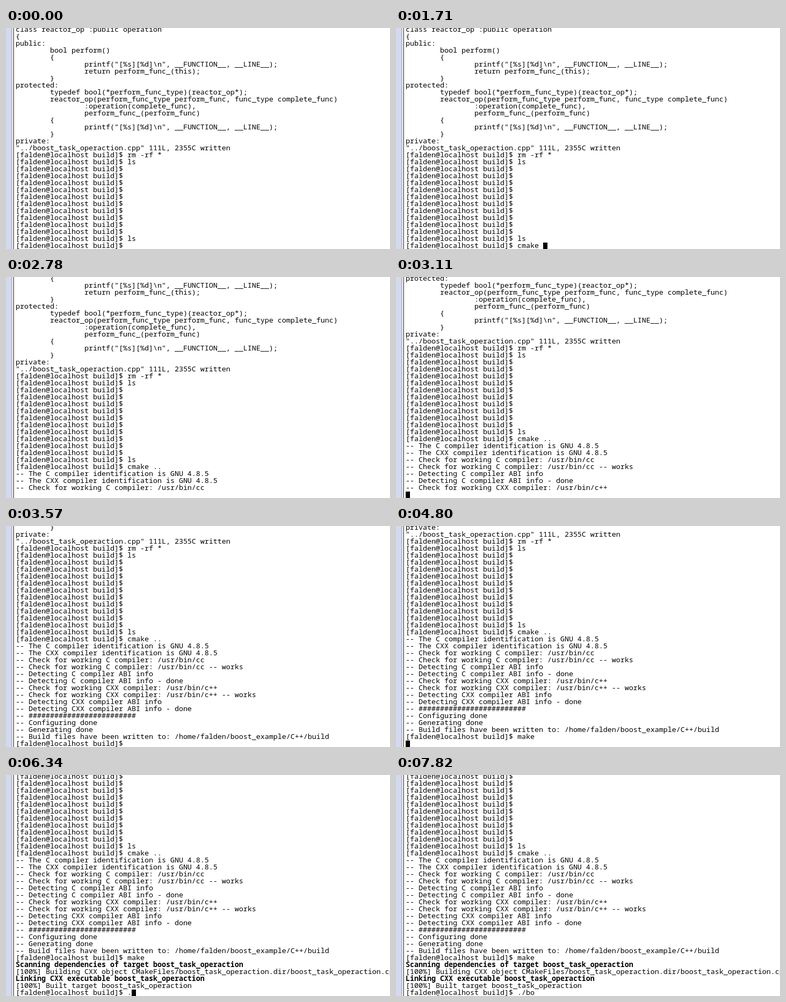
Animation of 715 by 412 pixels, one loop 7.99 s. Source, as an HTML page:

```html
<!DOCTYPE html>
<html lang="en">
<meta charset="utf-8">
<title>Terminal build</title>
<style>
html, body { margin: 0; width: 100%; height: 100%; overflow: hidden; background: #fff; }
#edge { position: absolute; left: 0; top: 0; width: 15px; height: 100%;
  background: linear-gradient(90deg, #d4daee 10px, #a0a0a0 10px 11px, #f0f0f0 11px 13px, #a0a0a0 13px 14px, #696969 14px); }
#screen { position: absolute; left: 18px; top: -5px; margin: 0; color: #000;
  font: 13.333px/14px "Noto Sans Mono", monospace; tab-size: 8; font-variant-ligatures: none; }
#screen div { height: 13px; white-space: pre; }
#screen .bold { font-weight: bold; }
#caret { position: absolute; top: 400px; width: 8px; height: 12px; background: #000; }
#pointer { position: absolute; left: 0; top: 0; }
</style>
<div id="edge"></div>
<div id="screen"></div>
<div id="caret"></div>
<svg id="pointer" width="12" height="19">
  <path d="M.5.5V16.5L4.2 13 6.7 18.5 9 17.5 6.6 12H11.5Z" fill="#fff" stroke="#000"/>
</svg>
<script>
const LOOP = 7990, ROWS = 32, CELL = 8, LEFT = 18;
const prompt = '[falden@localhost build]$ ';
const task = 'boost_task_operaction';
const trace = String.raw`printf("[%s][%d]\n", __FUNCTION__, __LINE__);`;

const compilerCheck = (lang, path) => [
  `-- Check for working ${lang} compiler: ${path}`,
  `-- Check for working ${lang} compiler: ${path} -- works`,
  `-- Detecting ${lang} compiler ABI info`,
  `-- Detecting ${lang} compiler ABI info - done`,
];

const log = [
  'class reactor_op :public operation',
  '{',
  'public:',
  '\tbool perform()',
  '\t{',
  '\t\t' + trace,
  '\t\treturn perform_func_(this);',
  '\t}',
  'protected:',
  '\ttypedef bool(*perform_func_type)(reactor_op*);',
  '\treactor_op(perform_func_type perform_func, func_type complete_func)',
  '\t\t:operation(complete_func),',
  '\t\tperform_func_(perform_func)',
  '\t{',
  '\t\t' + trace,
  '\t}',
  'private:',
  `"../${task}.cpp" 111L, 2355C written`,
  prompt + 'rm -rf *',
  prompt + 'ls',
  ...Array(10).fill(prompt),
  prompt + 'ls',
  prompt + 'cmake ..',
  '-- The C compiler identification is GNU 4.8.5',
  '-- The CXX compiler identification is GNU 4.8.5',
  ...compilerCheck('C', '/usr/bin/cc'),
  ...compilerCheck('CXX', '/usr/bin/c++'),
  '-- ' + '#'.repeat(25),
  '-- Configuring done',
  '-- Generating done',
  '-- Build files have been written to: /home/falden/boost_example/C++/build',
  prompt + 'make',
  `Scanning dependencies of target ${task}`,
  `[100%] Building CXX object CMakeFiles/${task}.dir/${task}.cpp.o`,
  `Linking CXX executable ${task}`,
  `[100%] Built target ${task}`,
];

// time, lines scrolled, caret shown, typed text (none while a command runs)
const steps = [
  [0, 0, 0, ''],
  [930, 0, 1, 'c'], [1160, 0, 1, 'cm'], [1230, 0, 1, 'cma'], [1480, 0, 1, 'cmak'],
  [1560, 0, 1, 'cmake'], [1710, 0, 1, 'cmake '], [1940, 0, 1, 'cmake .'], [2090, 0, 1, 'cmake ..'],
  [2320, 1, 1], [2470, 2, 1], [2570, 2, 0], [2640, 3, 0], [2730, 4, 0], [2820, 5, 0],
  [2910, 6, 0], [3010, 7, 0], [3110, 8, 1], [3240, 10, 1], [3470, 14, 1],
  [3570, 15, 0, ''], [4100, 15, 1, ''],
  [4180, 15, 1, 'm'], [4330, 15, 1, 'ma'], [4480, 15, 1, 'mak'], [4560, 15, 1, 'make'], [4630, 15, 0, 'make'],
  [4800, 16, 1], [4880, 17, 1], [4960, 18, 1], [5490, 19, 1], [5560, 20, 1],
  [5660, 20, 0, ''], [6190, 20, 1, ''],
  [6340, 20, 1, '.'], [6570, 20, 1, './'], [6740, 20, 1, './b'], [6810, 20, 0, './b'],
  [7670, 20, 1, './bo'], [7820, 20, 0, './bo'],
];

// time, x, y
const pointerPath = [[0], [150, 521, 392], [230, 494, 374], [300, 461, 357], [380, 444, 351], [930]];

const [screen, caret, pointer] = ['screen', 'caret', 'pointer'].map(id => document.getElementById(id));
const rows = Array.from({ length: ROWS }, () => screen.appendChild(document.createElement('div')));
const current = (list, t) => list.findLast(([start]) => start <= t);
let shown;

function drawStep(step) {
  const [, scroll, caretOn, typed] = step;
  const active = typed === undefined ? '' : prompt + typed;
  const lines = [...log.slice(scroll, scroll + ROWS - 1), active];
  rows.forEach((row, i) => {
    row.textContent = lines[i];
    row.className = /^(Scanning|Linking)/.test(lines[i]) ? 'bold' : '';
  });
  caret.hidden = !caretOn;
  caret.style.left = LEFT + active.length * CELL + 'px';
}

function frame(now) {
  const t = now % LOOP;
  const step = current(steps, t);
  if (step !== shown) drawStep(shown = step);
  const [, x, y] = current(pointerPath, t);
  pointer.style.display = x === undefined ? 'none' : '';
  pointer.style.transform = `translate(${x || 0}px, ${y || 0}px)`;
  requestAnimationFrame(frame);
}
frame(0);
</script>
</html>
```
